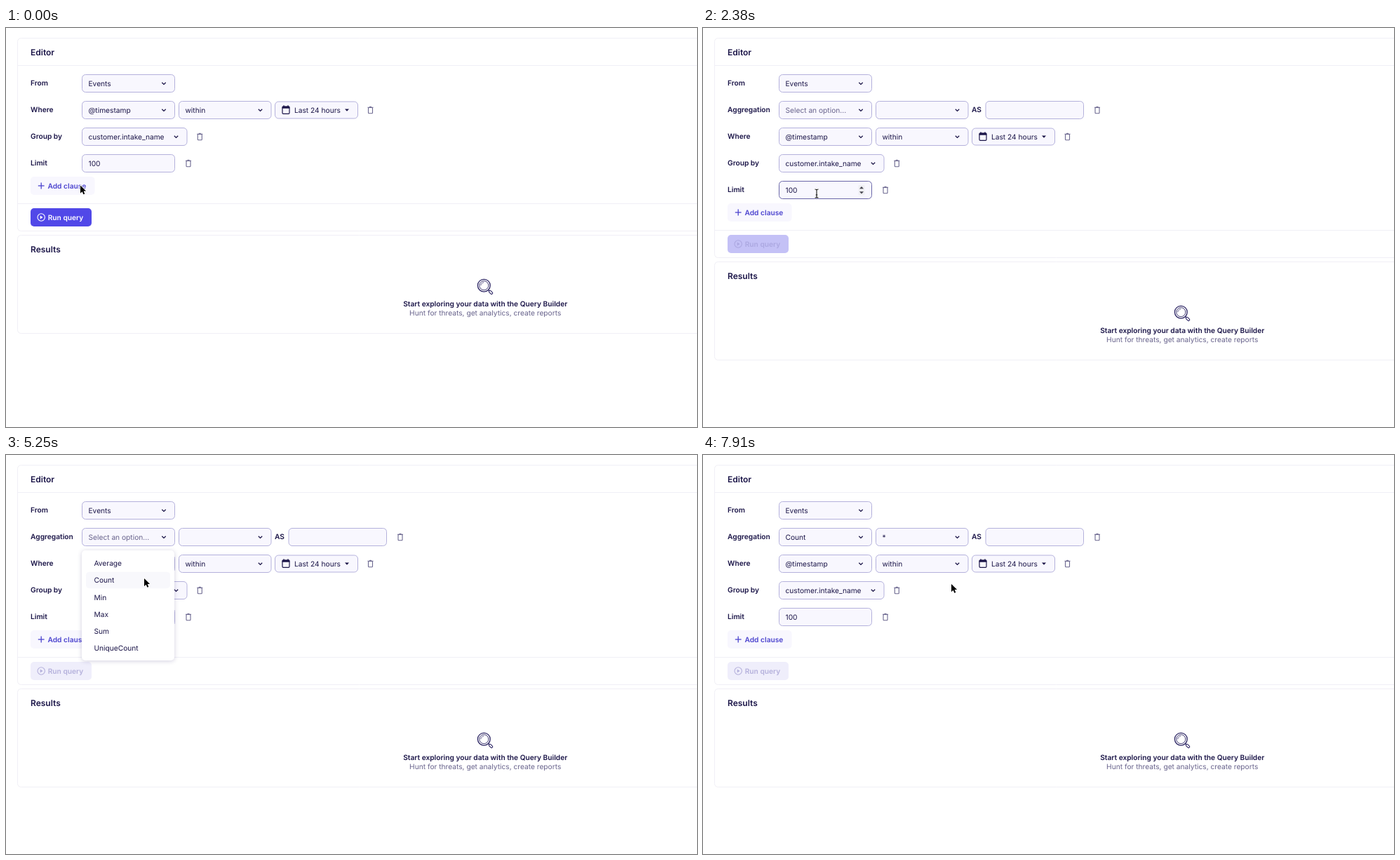
Recreate the animation shown at these times as an HTML page with a canvas. Size 985 by 569 pixels, loop 8000 ms.

```html
<!DOCTYPE html>
<html lang="en">
<head>
<meta charset="utf-8">
<title>Query editor</title>
<style>
html, body { margin: 0; width: 100%; height: 100%; overflow: hidden; background: #fff; }
canvas { display: block; width: 985px; height: 569px; }
</style>
</head>
<body>
<canvas id="stage"></canvas>
<script>
const W = 985, H = 569, LOOP = 8000, STEP = 70;
const canvas = document.getElementById('stage');
const dpr = window.devicePixelRatio || 1;
canvas.width = W * dpr;
canvas.height = H * dpr;
const g = canvas.getContext('2d');

const INK = '#1b1548', MUTED = '#68638c', FILL = '#f8f7fe', LINE = '#b4b1dc',
      HOVER = '#6a66a8', ACCENT = '#4d45cf', ICON = '#6c6890', CARD = '#f0eff6';

const T = { press: 700, addOpen: 840, addPick: 2100, fnOpen: 3640, fnPick: 5250,
            fnClose: 5320, fieldOpen: 6300, leave: 6790, fieldPick: 7910 };

// start, end, x, y
const MOVES = [
  [980, 1820, 162, 236], [2380, 3150, 207, 117], [4000, 4620, 197, 176],
  [5530, 5880, 300, 117], [6720, 6790, 305, 126], [6790, 7420, 354, 184]
];

const PROPS = ['ASsecurityintelligencecreationtime', 'ASsecurityintelligenceversion',
  'AVsecurityintelligencecreationtime', 'AVsecurityintelligenceversion',
  'AccessGranted', 'AccessList', 'AccessMask', 'AccessReason'];
const MENUS = {
  add: { x: 126, y: 217, w: 89.5, h: 134, tx: 144, first: 236, hx: 133, hw: 76.5,
    items: ['Aggregation', 'Group by', 'Order by', 'Select', 'Where'] },
  fn: { x: 108, y: 136, w: 132, h: 157, tx: 125.5, first: 154.3, hx: 114, hw: 120,
    items: ['Average', 'Count', 'Min', 'Max', 'Sum', 'UniqueCount'] },
  field: { x: 245.5, y: 136, w: 304.5, h: 390, tx: 263, first: 186, hx: 251, hw: 293,
    items: ['*', '@timestamp', 'action.id', 'action.name', 'action.outcome',
      'action.outcome_reason', 'action.properties',
      ...PROPS.map(p => 'action.properties.' + p)] }
};
const PITCH = 24.15;

const clamp = v => Math.max(0, Math.min(1, v));
const smooth = p => p * p * (3 - 2 * p);
const mix = (a, b, p) => `rgb(${a.map((v, i) => Math.round(v + (b[i] - v) * p))})`;
const inside = (p, x, y, w, h) => p.x >= x && p.x < x + w && p.y >= y && p.y < y + h;

function text(s, x, cy, color = INK, weight = 400, size = 10.2, align = 'left') {
  g.font = `${weight} ${size}px Inter, "Liberation Sans", sans-serif`;
  g.textAlign = align;
  g.fillStyle = color;
  g.fillText(s, x, cy + size * 0.364);
}

function box(x, y, w, h, r, fill, stroke, lw = 1) {
  g.beginPath();
  g.roundRect(x, y, w, h, r);
  if (fill) { g.fillStyle = fill; g.fill(); }
  if (stroke) { g.strokeStyle = stroke; g.lineWidth = lw; g.stroke(); }
}

function poly(points, stroke, lw, fill) {
  g.beginPath();
  points.forEach(([x, y]) => g.lineTo(x, y));
  if (fill) { g.closePath(); g.fillStyle = fill; g.fill(); }
  if (stroke) { g.strokeStyle = stroke; g.lineWidth = lw; g.stroke(); }
}

function ring(x, y, r, color, lw) {
  g.beginPath();
  g.arc(x, y, r, 0, Math.PI * 2);
  g.strokeStyle = color;
  g.lineWidth = lw;
  g.stroke();
}

const chevron = (x, y) => poly([[x - 2.7, y - 1.3], [x, y + 1.4], [x + 2.7, y - 1.3]], INK, 1.3);

function trash(x, y) {
  poly([[x - 4, y - 3.7], [x + 4, y - 3.7]], ICON, 1.1);
  poly([[x - 1.5, y - 4.7], [x + 1.5, y - 4.7]], ICON, 1);
  box(x - 3, y - 3.5, 6, 8.3, 1, null, ICON, 1.1);
}

function field(s, x, y, w, value, color) {
  const hot = !s.menu && inside(s.cursor, x, y, w, 26);
  box(x + 0.5, y + 0.5, w - 1, 25, 5, FILL, hot ? HOVER : LINE);
  if (value) text(value, x + 9.5, y + 13.6, color);
  return hot;
}

function select(s, x, y, w, value, color) {
  if (field(s, x, y, w, value, color)) s.pointer = 'hand';
  chevron(x + w - 16, y + 13);
}

function dateButton(s, x, y) {
  const hot = !s.menu && inside(s.cursor, x, y, 119, 25);
  box(x + 0.5, y + 0.5, 118, 24, 5, FILL, hot ? HOVER : LINE);
  box(x + 11, y + 7.5, 10, 10.3, 1.3, null, INK, 1.2);
  g.fillStyle = INK;
  g.fillRect(x + 10.8, y + 7.2, 10.4, 3);
  g.fillRect(x + 12.4, y + 5.8, 1.3, 2);
  g.fillRect(x + 18.3, y + 5.8, 1.3, 2);
  text('Last 24 hours', x + 28, y + 12.8);
  poly([[x + 100, y + 11], [x + 106, y + 11], [x + 103, y + 14.2]], null, 0, INK);
}

const label = (s, y) => text(s, 35, y + 12.6, INK, 600);

function runButton(t, y) {
  const off = t >= T.addPick, p = clamp((t - T.addPick + STEP) / 480);
  const bg = off ? mix([81, 72, 232], [239, 238, 251], p) : '#5148e8';
  const fg = off ? mix([148, 142, 238], [181, 177, 220], p) : '#fff';
  box(35, y, 87, 26, 5, bg);
  ring(50.2, y + 13, 5.2, fg, 1.1);
  poly([[48.7, y + 10.6], [52.6, y + 13], [48.7, y + 15.4]], null, 0, fg);
  text('Run query', 59.7, y + 13, fg, 600);
}

function magnifier(x, y) {
  const c = '#2a2362';
  ring(x, y, 8.9, c, 1.3);
  ring(x, y, 6.5, c, 0.9);
  g.beginPath();
  g.arc(x, y, 4.4, Math.PI, Math.PI * 1.5);
  g.lineWidth = 0.7;
  g.stroke();
  poly([[x + 6.3, y + 6.3], [x + 8, y + 8]], c, 1.3);
  g.save();
  g.translate(x + 9.6, y + 9.6);
  g.rotate(Math.PI / 4);
  box(-2.8, -1.5, 6, 3, 1.3, '#fff', c, 1.1);
  g.restore();
}

function editor(s, t) {
  const agg = t >= T.addPick, d = agg ? 38 : 0;

  box(16.5, 14.5, 1000, 275 + d, 5, null, CARD);
  box(16.5, 295.5 + d, 1000, 140, 5, null, CARD);
  poly([[17, 53.5], [W, 53.5]], CARD, 1);
  poly([[17, 250.5 + d], [W, 250.5 + d]], CARD, 1);

  text('Editor', 35, 34.5, INK, 600, 12);
  label('From', 66);
  select(s, 108, 66, 133, 'Events');

  if (agg) {
    const fn = t >= T.fnClose;
    label('Aggregation', 104);
    select(s, 108, 104, 133, fn ? 'Count' : 'Select an option...', fn ? INK : MUTED);
    select(s, 246, 104, 132.5, t >= T.fieldPick ? '*' : '');
    text('AS', 383, 116.6, INK, 600);
    if (field(s, 402.5, 104, 140.5)) s.pointer = 'beam';
    trash(562, 117);
  }

  label('Where', 104 + d);
  select(s, 108, 104 + d, 133, '@timestamp');
  select(s, 246, 104 + d, 132.5, 'within');
  dateButton(s, 383, 104.5 + d);
  trash(519.5, 117 + d);

  label('Group by', 142 + d);
  select(s, 108, 142 + d, 150.5, 'customer.intake_name');
  trash(276.3, 155 + d);

  label('Limit', 180 + d);
  if (field(s, 108, 180 + d, 133, '100')) {
    s.pointer = 'beam';
    box(221.5, 186 + d, 9, 14.5, 1, '#efeff3');
    poly([[223, 191.3 + d], [229, 191.3 + d], [226, 188 + d]], null, 0, '#46454f');
    poly([[223, 195.3 + d], [229, 195.3 + d], [226, 198.6 + d]], null, 0, '#46454f');
  }
  trash(260, 193 + d);

  box(35, 212 + d, 91.5, 26, 5, t >= T.press && t < T.addOpen ? '#eeecfc' : FILL);
  poly([[45.8, 225 + d], [54.6, 225 + d]], ACCENT, 1.3);
  poly([[50.2, 220.6 + d], [50.2, 229.4 + d]], ACCENT, 1.3);
  text('Add clause', 59.5, 225.2 + d, ACCENT, 600);
  runButton(t, 257 + d);

  text('Results', 35, 315.3 + d, INK, 600, 12);
  magnifier(681.3, 367.2 + d);
  text('Start exploring your data with the Query Builder', 683.2, 393.5 + d, INK, 600, 10.2, 'center');
  text('Hunt for threats, get analytics, create reports', 683.2, 406 + d, MUTED, 400, 10.2, 'center');
}

function searchBox(t) {
  box(251, 140.7, 293, 26.8, 5, FILL, '#cfccf3', 2.4);
  box(251.5, 141.2, 292, 25.8, 5, FILL, '#5149ad', 1.2);
  ring(267.8, 152.8, 3.8, ACCENT, 1.5);
  poly([[270.6, 155.6], [275, 160]], ACCENT, 1.6);
  text('Search...', 284.3, 154.3, MUTED);
  if (t < 6870 || t >= 7370) {
    g.fillStyle = INK;
    g.fillRect(284.3, 148.5, 1, 12);
  }
}

function menu(s, t) {
  const m = MENUS[s.menu];
  g.save();
  g.shadowColor = 'rgba(45, 35, 110, 0.22)';
  g.shadowBlur = 6 * dpr;
  g.shadowOffsetY = dpr;
  box(m.x, m.y, m.w, m.h, 5, '#fff');
  g.restore();

  g.save();
  g.beginPath();
  g.rect(m.x, m.y, m.w, s.menu === 'field' ? 385.5 : m.h);
  g.clip();
  m.items.forEach((item, i) => {
    const cy = m.first + i * PITCH;
    if (inside(s.cursor, m.hx, cy - 12, m.hw, PITCH)) {
      s.pointer = 'hand';
      box(m.hx, cy - 11.8, m.hw, 23.6, 5, '#f8f8fc');
    }
    text(item, m.tx, cy + 0.2);
  });
  g.restore();

  if (s.menu === 'field') {
    searchBox(t);
    if (t < T.leave) s.pointer = 'hand';
    else if (inside(s.cursor, 251, 141, 293, 27)) s.pointer = 'beam';
  } else if (s.menu === 'fn') {
    s.pointer = t < T.fnPick ? 'hand' : 'arrow';
  }
}

const ARROW = new Path2D('M0 0V11.2L2.6 8.8L4.4 12.8L6.3 12L4.6 8.1H8.1Z');
const HAND = new Path2D('M-1.5 6.6V.8Q-1.4 -.5 -.2 -.5Q1 -.4 1.1 .8V4.1' +
  'Q2.2 3.3 3.1 4.5Q4.3 3.9 5 5.1Q6.7 4.7 7 6.3V8.6Q6.8 10.4 5.8 11.4V13H-.3V11.8' +
  'Q-2.4 9.8 -4.2 7.3Q-4.6 6 -3.4 5.7Q-2.4 5.7 -1.5 6.9Z');
const BEAM = new Path2D('M-2.5 -6Q0 -6 0 -4.7Q0 -6 2.5 -6M0 -5V5M-2.5 6Q0 6 0 4.7Q0 6 2.5 6M-1.3 2H1.3');

function drawCursor(s) {
  g.save();
  g.translate(s.cursor.x, s.cursor.y);
  g.lineJoin = 'round';
  if (s.pointer === 'beam') {
    g.strokeStyle = '#fff';
    g.lineWidth = 2.4;
    g.stroke(BEAM);
    g.strokeStyle = '#111';
    g.lineWidth = 1.1;
    g.stroke(BEAM);
  } else if (s.pointer === 'hand') {
    g.fillStyle = '#fff';
    g.fill(HAND);
    g.strokeStyle = '#111';
    g.lineWidth = 1;
    g.stroke(HAND);
    g.stroke(new Path2D('M1.1 4.1V6.5M3.1 4.7V6.7M5 5.3V7M.7 8.6V11M2.5 8.6V11M4.3 8.6V11'));
  } else {
    g.strokeStyle = '#fff';
    g.lineWidth = 1.8;
    g.stroke(ARROW);
    g.fillStyle = '#000';
    g.fill(ARROW);
  }
  g.restore();
}

function cursorAt(t) {
  let x = 106, y = 224.5;
  for (const [a, b, tx, ty] of MOVES) {
    const p = smooth(clamp((t - a) / (b - a)));
    x += (tx - x) * p;
    y += (ty - y) * p;
  }
  return { x, y };
}

function menuAt(t) {
  if (t >= T.addOpen && t < T.addPick) return 'add';
  if (t >= T.fnOpen && t < T.fnClose) return 'fn';
  if (t >= T.fieldOpen && t < T.fieldPick) return 'field';
  return null;
}

function render(now) {
  const t = Math.floor((now % LOOP) / STEP) * STEP;
  const s = { cursor: cursorAt(t), menu: menuAt(t), pointer: 'arrow' };
  g.setTransform(dpr, 0, 0, dpr, 0, 0);
  g.textRendering = 'geometricPrecision';
  g.fillStyle = '#fff';
  g.fillRect(0, 0, W, H);
  editor(s, t);
  if (s.menu) menu(s, t);
  drawCursor(s);
}

const start = performance.now();
function tick() {
  render(performance.now() - start);
  requestAnimationFrame(tick);
}
tick();
</script>
</body>
</html>
```
